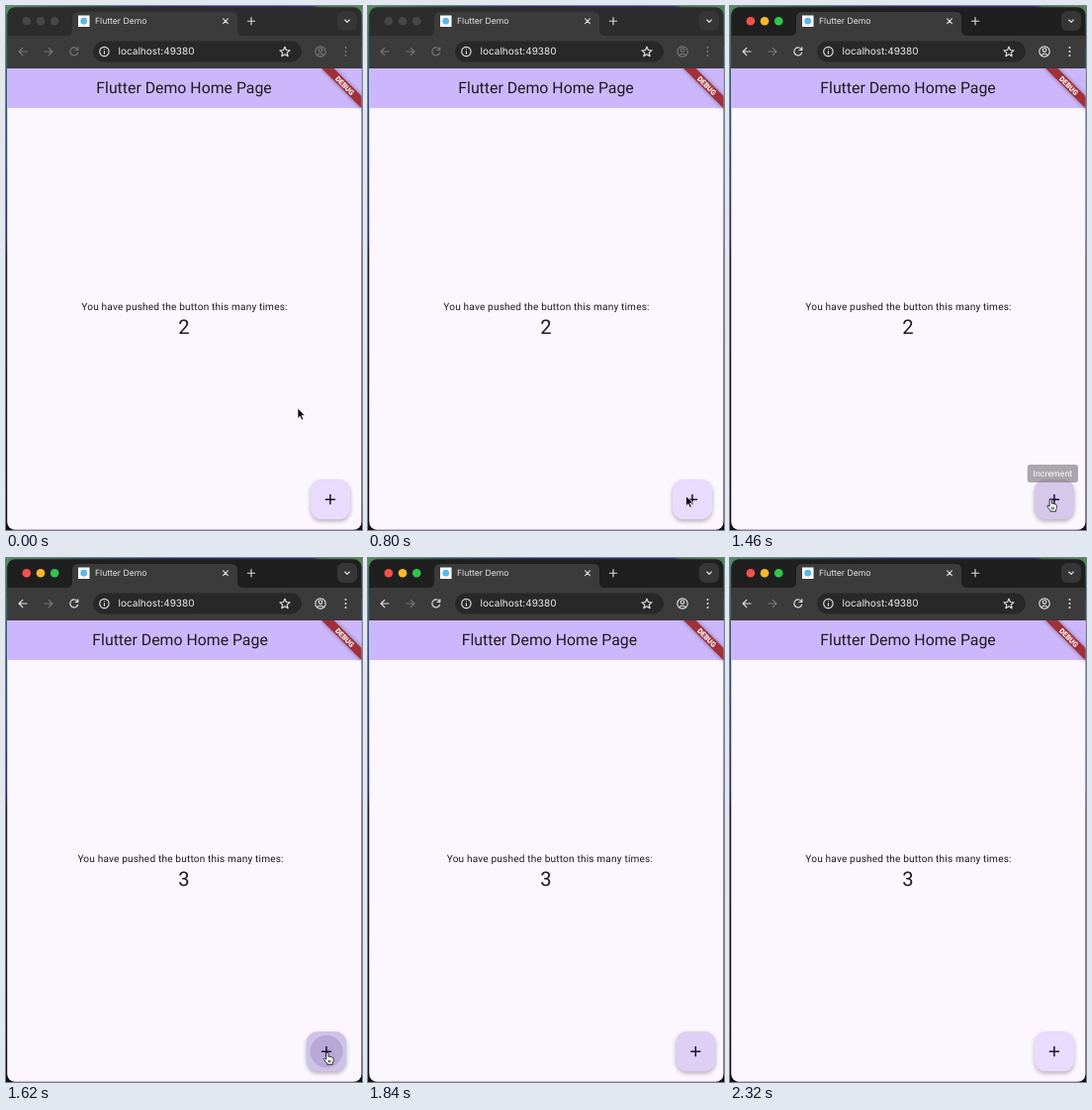
An HTML page that plays this animation: 360x529 px, repeating every 2.34 s.

```html
<!DOCTYPE html>
<html lang="en">
<head>
<meta charset="utf-8">
<title>Counter demo</title>
<style>
  html, body { margin: 0; width: 100%; height: 100%; overflow: hidden; background: #141416; }
  svg { display: block; width: 360px; height: 529px; text-rendering: geometricPrecision; }
  .ui { font-family: Inter, Roboto, sans-serif; }
  .app { font-family: Roboto, sans-serif; fill: #1d1b20; text-anchor: middle; }
  .line { fill: none; stroke-width: 1.15; stroke-linecap: round; stroke-linejoin: round; }
</style>
</head>
<body>
<svg viewBox="0 0 360 529" xmlns="http://www.w3.org/2000/svg">
  <defs>
    <clipPath id="win"><rect x="1.2" y="1.2" width="358.3" height="527.6" rx="8"/></clipPath>
    <clipPath id="page"><rect x="1" y="63" width="359" height="466"/></clipPath>
    <linearGradient id="wallTop">
      <stop offset="0" stop-color="#4f8f5c"/>
      <stop offset=".2" stop-color="#2c5a50"/>
      <stop offset=".45" stop-color="#29296a"/>
      <stop offset=".86" stop-color="#2f2d80"/>
      <stop offset=".88" stop-color="#3f7348"/>
      <stop offset="1" stop-color="#4c8850"/>
    </linearGradient>
    <linearGradient id="wallSide" x2="0" y2="1">
      <stop offset="0" stop-color="#3b7f66"/>
      <stop offset=".2" stop-color="#28557c"/>
      <stop offset=".44" stop-color="#24306c"/>
      <stop offset=".48" stop-color="#191829"/>
      <stop offset="1" stop-color="#100f14"/>
    </linearGradient>
    <filter id="blur" x="-40%" y="-40%" width="180%" height="180%"><feGaussianBlur stdDeviation="2.2"/></filter>
  </defs>

  <rect width="360" height="529" fill="url(#wallSide)"/>
  <rect width="360" height="8" fill="url(#wallTop)"/>

  <g clip-path="url(#win)">
    <rect id="strip" width="360" height="40"/>
    <path fill="#3b3b3c" d="M0 30H61Q67 30 67 24V12Q67 6 73 6H228Q234 6 234 12V24Q234 30 240 30H360V63H0Z"/>
    <g id="lights"><circle cx="20.8" cy="15.2" r="4.3"/><circle cx="35" cy="15.2" r="4.3"/><circle cx="49.2" cy="15.2" r="4.3"/></g>

    <rect x="73" y="9.5" width="11.5" height="11.5" fill="#fff"/>
    <circle cx="78.7" cy="15.2" r="3.4" fill="#54b9ee"/>
    <text class="ui" x="90" y="18.2" font-size="8.6" fill="#e6e6e8">Flutter Demo</text>
    <rect x="335" y="5" width="20" height="20" rx="6" fill="#363637"/>
    <g class="line" stroke="#dcdcde">
      <path d="M219.6 12.8l4.8 4.8m0-4.8l-4.8 4.8M244.4 15.2h7.2m-3.6-3.6v7.2M342.7 14l2.3 2.4l2.3-2.4"/>
    </g>

    <rect x="88" y="35.6" width="211" height="20.8" rx="10.4" fill="#282829"/>
    <g class="line" id="nav">
      <path d="M21 46h-7.8m3.6-3.7l-3.7 3.7l3.7 3.7"/>
      <path d="M72.4 44.1a4 4 0 1 0 .2 3.1M72.8 41.8v2.7h-2.7"/>
      <circle cx="318" cy="46" r="5.2"/><circle cx="318" cy="44.5" r="1.8"/><path d="M314.6 49.6q3.4-2.7 6.8 0"/>
    </g>
    <path class="line" stroke="#777779" d="M39 46h7.8m-3.6-3.7l3.7 3.7l-3.7 3.7"/>
    <g id="dots"><circle cx="343.5" cy="42" r="1"/><circle cx="343.5" cy="46" r="1"/><circle cx="343.5" cy="50" r="1"/></g>
    <g class="line" stroke="#e0e0e2">
      <circle cx="99.4" cy="46" r="4.7"/><path d="M99.4 45.8v2.4m0-4.7v.1"/>
      <path id="star"/>
    </g>
    <text class="ui" x="113.6" y="49.4" font-size="10" fill="#ececee">localhost:49380</text>

    <g clip-path="url(#page)">
      <rect y="63" width="360" height="466" fill="#fcf6fe"/>
      <rect y="63" width="360" height="40" fill="#cdb7fc"/>
      <g id="shake">
        <text class="app" x="180" y="88.3" font-size="15.85">Flutter Demo Home Page</text>
        <text class="app" x="180.5" y="307" font-size="10.08" letter-spacing=".18">You have pushed the button this many times:</text>
        <rect x="308" y="480.3" width="40" height="40" rx="11.5" fill="#4c4654" opacity=".42" filter="url(#blur)"/>
        <rect id="fab" x="307.8" y="478" width="40.3" height="40.3" rx="11.5"/>
        <circle id="ripple" cx="328" cy="498.2" fill="#5f4c90"/>
        <path d="M322.8 498.2h10.2m-5.1-5.1v10.2" stroke="#1f0c45" stroke-width="1.5" fill="none"/>
      </g>
      <text id="count" class="app" x="180" y="331" font-size="20.2"></text>
      <g id="tip">
        <rect x="300.7" y="463" width="51.3" height="18" rx="3" fill="#777479"/>
        <text class="app" x="326.4" y="475" font-size="8.64" letter-spacing=".1" style="fill:#fff">Increment</text>
      </g>
      <g transform="translate(360 63) rotate(45)">
        <rect x="-29" y="20.2" width="58" height="8.6" fill="#40303c" opacity=".55" filter="url(#blur)"/>
        <rect x="-29" y="20.2" width="58" height="8.6" fill="#a23038"/>
        <text class="app" x="0" y="27.2" font-size="7.35" font-weight="900" style="fill:#fff">DEBUG</text>
      </g>
    </g>
  </g>

  <path id="arrow" d="M0 0V10.4L2.4 8.2L4 11.9L5.8 11.1L4.2 7.5H7.4Z" fill="#08080a" stroke="#fff" stroke-width=".7"/>
  <path id="hand" d="M-1.1 .6Q-1 -.4 0 -.4Q1 -.4 1.1 .6V3.9Q2.2 3.2 2.9 4.2Q4 3.7 4.6 4.7Q6 4.5 6.1 5.9V8Q6.1 9.3 5.2 10.4V11.8H-.2V10.7Q-2 9 -3.3 6.8Q-3.5 5.5 -2.2 5.6L-1.1 6.7ZM1.4 7.2v2.7M3 7.2v2.7" fill="#fff" stroke="#141416" stroke-width=".85" stroke-linejoin="round"/>
</svg>

<script>
const LOOP = 2340, FOCUS = 820, TAP = 1510, SHAKE = 500;
const $ = id => document.getElementById(id);
const set = (el, name, value) => el.setAttribute(name, value);
const ramp = (t, a, b) => Math.min(1, Math.max(0, (t - a) / (b - a)));
const smooth = p => p * p * (3 - 2 * p);

// Interpolates rows of [time, ...values].
function track(rows, t, ease = p => p) {
  let i = 0;
  while (i < rows.length - 2 && t >= rows[i + 1][0]) i++;
  const [a, b] = [rows[i], rows[i + 1]];
  const p = ease(ramp(t, a[0], b[0]));
  return a.slice(1).map((v, k) => v + (b[k + 1] - v) * p);
}

const pointer = [
  [0, 295, 406], [490, 320.5, 492], [FOCUS, 321.5, 494.5],
  [1180, 322.5, 496], [1620, 325, 499.5], [1780, 345, 535]
];
const tint = [
  [FOCUS, 232, 219, 253], [920, 214, 201, 236], [1440, 214, 201, 236],
  [1540, 207, 194, 232], [1640, 207, 194, 232], [1990, 232, 219, 253]
];
const lit = ['#fb5048', '#fbb92c', '#30c648'];

const star = Array.from({ length: 10 }, (_, i) => {
  const r = i % 2 ? 2.4 : 5.3, a = i * Math.PI / 5;
  return (282 + r * Math.sin(a)).toFixed(2) + ' ' + (46.4 - r * Math.cos(a)).toFixed(2);
});
set($('star'), 'd', 'M' + star.join('L') + 'Z');

function draw(t) {
  const on = t >= FOCUS;
  set($('strip'), 'fill', on ? '#1f1f20' : '#2c2c2d');
  [...$('lights').children].forEach((c, i) => set(c, 'fill', on ? lit[i] : '#464648'));
  set($('nav'), 'stroke', on ? '#e0e0e2' : '#777779');
  set($('dots'), 'fill', on ? '#e0e0e2' : '#777779');

  const p = ramp(t, TAP, TAP + SHAKE);
  set($('shake'), 'transform', `translate(${(-4 * Math.sin(p * 2 * Math.PI)).toFixed(2)} 0)`);
  set($('fab'), 'fill', `rgb(${track(tint, t).map(Math.round)})`);
  set($('ripple'), 'r', 20 * ramp(t, TAP - 70, 1660));
  set($('ripple'), 'opacity', .22 * (1 - ramp(t, 1640, 1820)));
  $('count').textContent = t < TAP ? 2 : 3;
  set($('tip'), 'opacity', ramp(t, 1020, 1160) * (1 - ramp(t, 1430, 1510)));

  const [x, y] = track(pointer, t, smooth);
  for (const id of ['arrow', 'hand']) {
    const show = t < 1780 && (id === 'hand') === on;
    set($(id), 'visibility', show ? 'visible' : 'hidden');
    set($(id), 'transform', `translate(${x.toFixed(2)} ${y.toFixed(2)})`);
  }
}

const start = performance.now();
function frame() {
  draw((performance.now() - start) % LOOP);
  requestAnimationFrame(frame);
}
draw(0);
requestAnimationFrame(frame);
</script>
</body>
</html>
```
